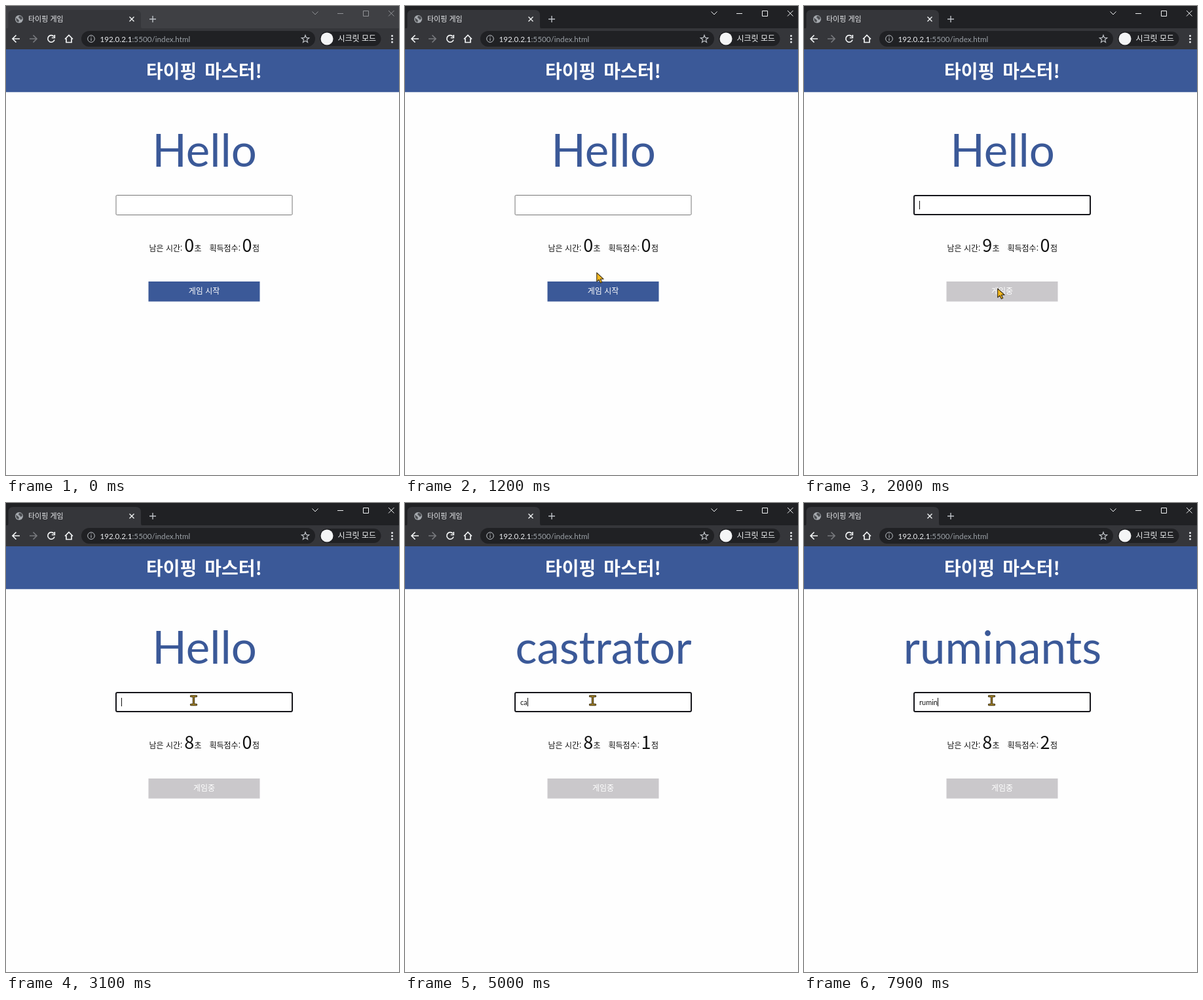
These frames come from a looping animation (600 by 715 pixels, 8000 ms). An HTML page:

```html
<!DOCTYPE html>
<html lang="ko">
<head>
<meta charset="utf-8">
<title>타이핑 게임</title>
<style>
  html, body { margin: 0; width: 100%; height: 100%; overflow: hidden; background: #fefefe; }
  svg { display: block; width: 600px; height: 715px; }
  text { font-family: "Noto Sans CJK KR", "Noto Sans CJK", sans-serif; font-size: 12px; white-space: pre; }
  .latin { font-family: Lato, "Open Sans", sans-serif; }
  .mid { text-anchor: middle; }
  .line { fill: none; stroke-width: 1.7; }
  .thin { fill: none; stroke-width: 1; }
  .on { stroke: #f1f3f4; }
  .dim { stroke: #bdc1c6; }
  .digit { font-size: 27px; fill: #111; }
</style>
</head>
<body>
<svg viewBox="0 0 600 715" xmlns="http://www.w3.org/2000/svg">
  <rect width="600" height="715" fill="#fefefe"/>

  <!-- tab strip -->
  <rect id="strip" width="600" height="35"/>
  <path d="M0 35Q3.500 35 3.500 31V14Q3.500 6 11 6H198Q206 6 206 14V31Q206 35 210 35Z" fill="#35363a"/>
  <circle cx="20" cy="20" r="6" fill="#a5a9ae"/>
  <path d="M15 18l3 2 2 2-1 3-3-2ZM20 15l4 1 1 4-3 1-1-2-2-1Z" fill="#4b4d51"/>
  <text x="34" y="23.500" style="font-size:11px" fill="#e8eaed">타이핑 게임</text>
  <path class="line on" style="stroke-width:1.400" d="M188.500 16.500l7 7m0-7l-7 7"/>
  <path class="line dim" style="stroke-width:1.400" d="M219 20h10m-5-5v10"/>
  <g id="controls" class="thin">
    <path d="M467.500 8.500l4.500 4.500 4.500-4.500M506 11.500h9M545.500 7.500h8v8h-8ZM584 7l8.500 8.500m0-8.500l-8.500 8.500"/>
  </g>

  <!-- toolbar -->
  <rect y="34" width="600" height="32" fill="#35363a"/>
  <path class="line on" d="M21 50H10m5.500-5.500L10 50l5.500 5.500"/>
  <path class="line" stroke="#77797d" d="M36 50h11m-5.500-5.500L47 50l-5.500 5.500"/>
  <path class="line on" d="M73 46.500a5.200 5.200 0 1 0 1 5M74.300 44v4.500h-4.500"/>
  <path class="line on" d="M90 50.500l6-6 6 6M92 49.500v6h8v-6"/>
  <rect x="115" y="38" width="357" height="24" rx="12" fill="#202124"/>
  <circle class="thin dim" cx="130" cy="50" r="5.300"/>
  <path class="thin dim" d="M130 49v4m0-6.500v1.300"/>
  <text class="latin" x="143.500" y="54.500" style="font-size:11.700px" fill="#e8eaed">192.0.2.1<tspan fill="#9aa0a6">:5500/index.html</tspan></text>
  <path id="star" class="line dim" style="stroke-width:1.200"/>
  <rect x="479" y="39" width="93.500" height="22" rx="11" fill="#202124"/>
  <circle cx="490" cy="50" r="9.500" fill="#f4f5f6"/>
  <text x="506.500" y="54" fill="#f1f3f4">시크릿 모드</text>
  <g fill="#e8eaed"><circle cx="589.500" cy="45.500" r="1.500"/><circle cx="589.500" cy="50.200" r="1.500"/><circle cx="589.500" cy="55" r="1.500"/></g>

  <!-- page -->
  <rect y="66" width="600" height="65.300" fill="#3b5998"/>
  <text class="mid" x="302.500" y="109.500" style="font-size:28px;font-weight:700;word-spacing:4px" fill="#fff">타이핑 마스터!</text>
  <text id="word" class="latin mid" x="303" y="245" style="font-size:69px" fill="#3b5998"></text>
  <rect id="field" fill="#fff" x="168"/>
  <text id="typed" class="latin" x="176" y="308" style="font-size:11px" fill="#111"></text>
  <rect id="caret" y="297" width="1" height="13" fill="#111"/>
  <g fill="#111">
    <text x="218.500" y="374">남은 시간:</text>
    <text x="287.500" y="374">초</text>
    <text x="310.500" y="374">획득점수:</text>
    <text x="376" y="374">점</text>
  </g>
  <text id="time" class="digit mid" x="279.800" y="375"></text>
  <text id="score" class="digit mid" x="368" y="375"></text>
  <rect id="button" x="217.500" y="420" width="170" height="30.500"/>
  <text id="label" class="mid" x="302.500" y="439" fill="#fff"></text>

  <!-- pointers -->
  <path id="arrow" d="M.7.800V14.300l3.300-2.900 2.300 5 2.400-1.100-2.300-4.800h4.700Z" fill="#f5b91f" stroke="#3a2f18" stroke-width="1.100" stroke-linejoin="round"/>
  <g id="beam" transform="translate(286.500 301)" fill="none" stroke-linecap="round">
    <path d="M-4-6.500H4M0-6.500V6.500M-4 6.500H4" stroke="#40351a" stroke-width="3.400"/>
    <path d="M-4-6.500H4M0-6.500V6.500M-4 6.500H4" stroke="#a88628" stroke-width="1.300"/>
  </g>
</svg>
<script>
const LOOP = 8000, STEP = 100, START = 2000, ACTIVATE = 1100, BEAM_AT = 2500;
const $ = id => document.getElementById(id);
const set = (id, attrs) => { for (const k in attrs) $(id).setAttribute(k, attrs[k]); };
const show = (id, visible) => set(id, { visibility: visible ? 'visible' : 'hidden' });
const write = (id, text) => { if ($(id).textContent !== text) $(id).textContent = text; };

// Each track holds [time, value] pairs; the value stays until the next pair.
const words = [[0, 'Hello'], [4300, 'castrator'], [6200, 'ruminants']];
const seconds = [[0, 0], [2000, 9], [3000, 8], [4000, 7], [5000, 8], [6000, 7], [7000, 8]];
const entries = [
  ['hell', [3700, 3800, 4000, 4100], 4300],
  ['castrato', [4900, 5000, 5100, 5400, 5600, 5700, 5900, 6000], 6200],
  ['rumin', [6900, 7100, 7600, 7800, 7900], LOOP]
];
const caretOff = [[2500, 3100], [3600, 3700], [4800, 4900], [6800, 6900]];
const path = [[100, 318, 196], [600, 286, 330], [900, 287, 340], [1300, 293, 418],
  [1400, 293, 418], [1600, 292, 437], [1700, 295, 430], [2100, 295, 430], [2500, 286, 301]];

const current = (track, t) => track.filter(([at]) => at <= t).pop()[1];
const ease = p => p * p * (3 - 2 * p);

function typedText(t) {
  const [text, keys] = entries.find(entry => t < entry[2]);
  return text.slice(0, keys.filter(at => at <= t).length);
}

function pointerAt(t) {
  const next = path.findIndex(([at]) => at > t);
  if (next < 1) return path[next < 0 ? path.length - 1 : 0].slice(1);
  const [t0, x0, y0] = path[next - 1], [t1, x1, y1] = path[next];
  const p = ease((t - t0) / (t1 - t0));
  return [x0 + (x1 - x0) * p, y0 + (y1 - y0) * p];
}

function render(t) {
  const active = t >= ACTIVATE, playing = t >= START;
  set('strip', { fill: active ? '#202124' : '#3f4044' });
  set('controls', { stroke: active ? '#f1f3f4' : '#909296' });

  write('word', current(words, t));
  write('time', String(current(seconds, t)));
  write('score', String(words.filter(([at]) => at <= t).length - 1));
  write('label', playing ? '게임중' : '게임 시작');
  set('button', { fill: playing ? '#cac8cb' : '#3b5998' });

  set('field', playing
    ? { y: 289, width: 269, height: 29, rx: 2, stroke: '#15151a', 'stroke-width': 2 }
    : { y: 288.5, width: 269, height: 30, rx: 1.5, stroke: '#767676', 'stroke-width': 1 });
  const text = typedText(t);
  write('typed', text);
  set('caret', { x: 176 + (text ? Math.round($('typed').getComputedTextLength()) : 0) });
  show('caret', playing && !caretOff.some(([from, to]) => t >= from && t < to));

  const [x, y] = pointerAt(t);
  set('arrow', { transform: `translate(${x} ${y})` });
  show('arrow', t >= path[0][0] && t < BEAM_AT);
  show('beam', t >= BEAM_AT);
}

const starPoints = Array.from({ length: 10 }, (_, i) => {
  const r = i % 2 ? 2.6 : 6, a = i * Math.PI / 5;
  return `${457 + r * Math.sin(a)} ${50.5 - r * Math.cos(a)}`;
});
set('star', { d: `M${starPoints.join('L')}Z` });

const origin = performance.now();
function tick() {
  const t = (performance.now() - origin) % LOOP;
  render(Math.floor(t / STEP) * STEP);
  requestAnimationFrame(tick);
}
tick();
</script>
</body>
</html>
```
